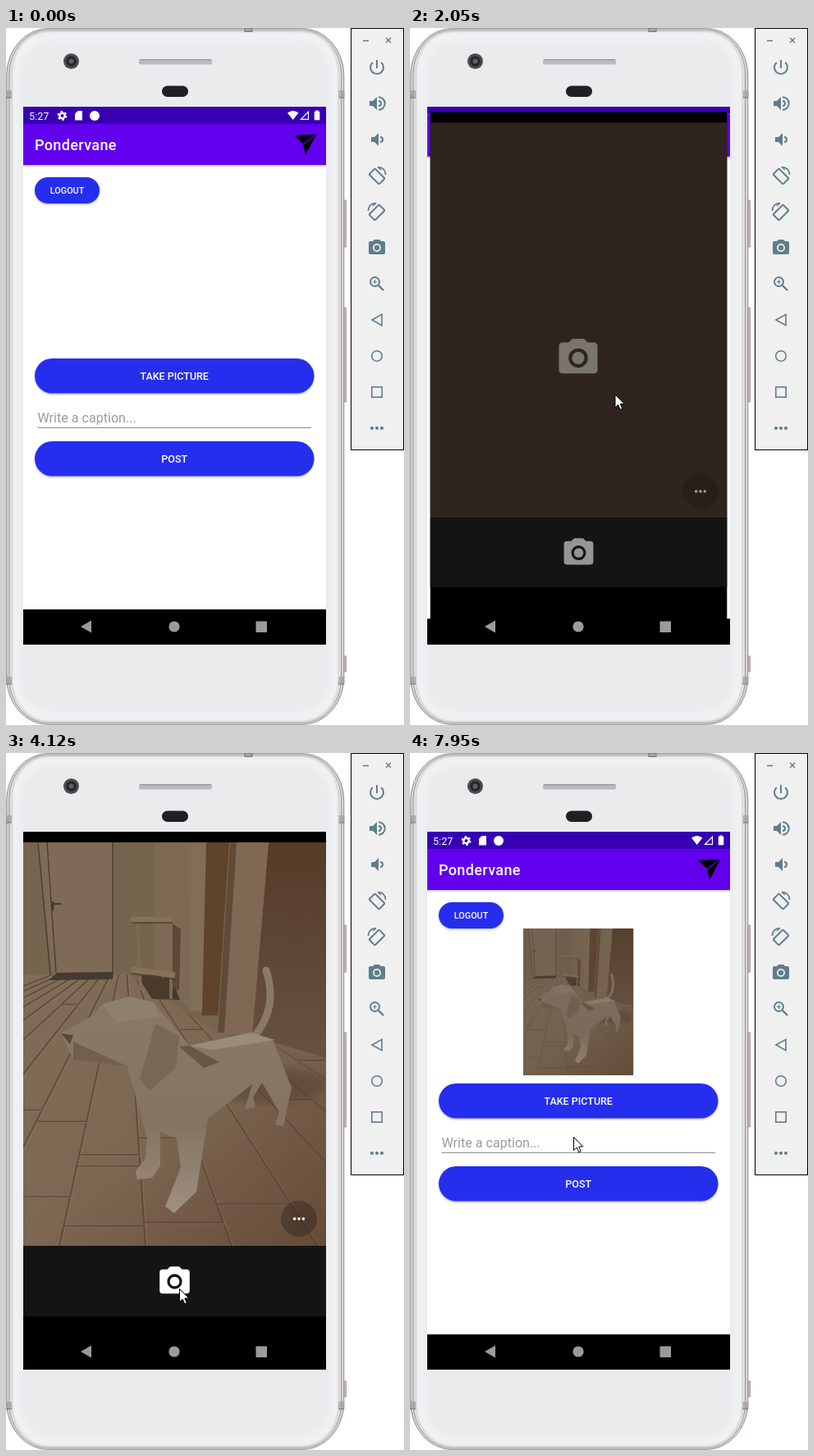
Write an HTML page that moves like this. It is 485x850 px and loops after 8000 ms.

```html
<!DOCTYPE html>
<html lang="en">
<head>
<meta charset="utf-8">
<title>Phone emulator</title>
<style>
html, body { margin: 0; width: 100%; height: 100%; overflow: hidden; background: #fff; }
svg { display: block; width: 485px; height: 850px; }
text { font-family: Roboto, sans-serif; }
.btn { font-weight: 500; fill: #fff; text-anchor: middle; }
</style>
</head>
<body>
<svg id="stage" viewBox="0 0 485 850" xmlns="http://www.w3.org/2000/svg"></svg>
<script>
const LOOP = 8000, STRIDE = 120;
const SLATE = '#5f7d8b', GREY = '#9b9b9b', BLUE = '#282eee';

const poly = (points, fill, extra = '') => `<polygon points="${points}" fill="${fill}" ${extra}/>`;
const rect = (x, y, w, h, fill, extra = '') => `<rect x="${x}" y="${y}" width="${w}" height="${h}" fill="${fill}" ${extra}/>`;
const disc = (x, y, r, fill, extra = '') => `<circle cx="${x}" cy="${y}" r="${r}" fill="${fill}" ${extra}/>`;
const line = (d, color, width = 1, extra = '') => `<path d="${d}" fill="none" stroke="${color}" stroke-width="${width}" ${extra}/>`;
const at = (x, y, body, extra = '') => `<g transform="translate(${x} ${y}) ${extra}">${body}</g>`;
const dots = (x, y, gap, r, fill) => [-1, 0, 1].map(i => disc(x + i * gap, y, r, fill)).join('');
const shutter = (x, y, scale, fill) => at(x, y, `<path fill="${fill}" fill-rule="evenodd"
  d="M-3 -10H3L5 -8H8Q10 -8 10 -6V6Q10 8 8 8H-8Q-10 8 -10 6V-6Q-10 -8 -8 -8H-5zM-5 0A5 5 0 0 0 5 0A5 5 0 0 0 -5 0z"/>`
  + disc(0, 0, 3.2, fill), `scale(${scale})`);

// Seeded random numbers in 0..1
let seed = 7;
const rand = () => (seed = seed * 16807 % 2147483647) / 2147483647;

const DEFS = `<defs>
  <clipPath id="screen">${rect(21, 96, 369, 656)}</clipPath>
  <clipPath id="view">${rect(21, 109, 369, 492)}</clipPath>
  <clipPath id="bar">${rect(21, 601, 369, 86)}</clipPath>
  <clipPath id="pill">${rect(35, 403, 340.5, 42.5, '', 'rx="21.25"')}</clipPath>
  <clipPath id="floor"><path d="M21 270H150L258 342L390 372V601H21z"/></clipPath>
  <linearGradient id="wood" x2="1" y2="1">
    <stop stop-color="#806c57"/><stop offset=".5" stop-color="#7d6752"/><stop offset="1" stop-color="#654b38"/>
  </linearGradient>
  <linearGradient id="brown" x2="0" y2="1"><stop stop-color="#543c29"/><stop offset="1" stop-color="#695140"/></linearGradient>
  <linearGradient id="coat" x2="0" y2="1"><stop stop-color="#8a7967"/><stop offset=".6" stop-color="#857361"/><stop offset="1" stop-color="#a09080"/></linearGradient>
  <filter id="soft"><feGaussianBlur stdDeviation="4"/></filter>
  <filter id="drop" x="-5%" y="-20%" width="110%" height="150%"><feDropShadow dx="0" dy="1.3" stdDeviation=".9" flood-opacity=".3"/></filter>
</defs>`;

function phone() {
  const shell = (inset, fill, stroke) => rect(inset, inset * .6, 412.5 - inset * 2, 850 - inset * 1.2, fill,
    `rx="${52 - inset}" ry="${58 - inset}" stroke="${stroke}"`);
  const band = y => rect(0, y, 8, 9, '#a8a1a3') + rect(404.5, y, 8, 9, '#a8a1a3') + line(`M0 ${y + 9}h8m396 0h8`, '#6f686a');
  const key = (y, h) => rect(412, y, 2.5, h, '#c9c3c5', 'stroke="#8c8587" stroke-width=".7"');
  return key(210, 57) + key(341, 115) + key(766, 19)
    + shell(.7, '#d5cfd1', '#968f92') + shell(4, '#e0dbdd', '#989194') + band(76) + band(791)
    + shell(7.5, '#e9ebed', '#c7c3c5')
    + rect(13, 10, 387, 830, 'none', 'rx="42" stroke="#f7f8f9" stroke-width="5" filter="url(#soft)"')
    + rect(291, 0, 9, 4.5, '#aaa3a5', 'stroke="#777072"')
    + disc(79.5, 40.5, 9.5, '#4b4c4e') + disc(79.5, 40.5, 6.3, '#252729') + disc(79.5, 40.5, 3, '#5a626b')
    + rect(162, 38, 89, 6.5, '#b9b9c1', 'rx="2"') + line('M163 38.6h87', '#8f8f98')
    + rect(190, 70.5, 32, 13.5, '#1e2023', 'rx="6.75"');
}

function panel() {
  const stroke = (d, w = 2) => line(d, SLATE, w);
  const speaker = x => poly('0,-3 4,-3 9,-8 9,8 4,3 0,3', SLATE, `transform="translate(${x} 0)"`);
  const wave = (x, r) => stroke(`M${x} ${-r}A${r} ${r} 0 0 1 ${x} ${r}`);
  const turn = rect(-8.5, -5, 17, 10, 'none', `rx="1" stroke="${SLATE}" stroke-width="2" transform="translate(0 1) rotate(45)"`)
    + stroke('M1 -10.5Q10 -10 10.7 -1M1 -10.5l4 3.5', 1.6);
  const icons = [
    stroke('M0 -9V1M-5.2 -6.1A8 8 0 1 0 5.2 -6.1'),
    speaker(-9) + wave(2, 3) + wave(2, 7.7),
    speaker(-7) + wave(4, 3),
    turn,
    `<g transform="scale(-1 1)">${turn}</g>`,
    shutter(0, 0, 1, SLATE),
    disc(-2.5, -2.5, 5.5, 'none', `stroke="${SLATE}" stroke-width="2"`) + stroke('M2 2L8 8', 2.4) + stroke('M-5 -2.5h5M-2.5 -5v5', 1.2),
    stroke('M-6 0L6 -6.7V6.7z', 1.6),
    disc(0, 0, 6.3, 'none', `stroke="${SLATE}" stroke-width="1.6"`),
    rect(-6.2, -6.2, 12.4, 12.4, 'none', `stroke="${SLATE}" stroke-width="1.6"`),
    dots(0, 0, 6, 2.1, SLATE)
  ];
  return rect(420.5, .5, 64, 514, '#f0f0f0', 'stroke="#000"')
    + line('M435 15.5h7m21 -3.5l6 6m0 -6l-6 6', '#66757c', 1.3)
    + icons.map((body, i) => at(452, 48 + 44 * i, body)).join('');
}

function planks() {
  const eye = { x: 145, y: 235 }, gap = 105, depth = 366;
  let d = '';
  for (let i = -8; i < 12; i++) {
    const foot = 65 + i * gap;
    d += `M${eye.x} ${eye.y}L${foot} 601`;
    for (let j = 0; j < 3; j++) {
      const k = .15 + .85 * rand();
      d += `M${eye.x + (foot - eye.x) * k} ${eye.y + depth * k}h${gap * k}`;
    }
  }
  return line(d, '#4d3a2b', 1.8, 'opacity=".6"') + line(d, '#947f69', 1, 'opacity=".4" transform="translate(2 1)"');
}

function scene() {
  const room = rect(21, 109, 369, 492, '#77644f')
    + poly('39,109 130,109 131,268 56,270', '#7e6a56') + line('M39 109L54 270M50 109L61 268M130 109V268', '#4b3d30', 1.4)
    + line('M57 184h10m-10 -3v11', '#43362b', 2)
    + poly('181,109 226,109 224,314 181,268', '#7d6954')
    + poly('243,109 273,109 262,320 238,320', '#5f432b')
    + poly('225,109 244,109 239,316 224,314', '#826d57')
    + poly('320,109 390,109 390,372 299,345', 'url(#brown)')
    + poly('272,109 320,109 300,345 257,341', '#7f6954') + line('M277 109L262 341', '#604b38', 8);
  const floor = `<g clip-path="url(#floor)">${rect(21, 260, 369, 341, 'url(#wood)') + planks()
    + '<ellipse cx="320" cy="405" rx="70" ry="22" fill="#4b3726" opacity=".4" filter="url(#soft)"/>'}</g>`
    + poly('52,277 62,268 131,267 130,276', '#443a31');
  const stool = poly('160,272 200,268 212,301 178,300', '#493a2c') + poly('203,208 213,215 211,290 203,285', '#5c4936')
    + line('M160 205L164 290M182 206V262M191 206V275M201 206V300', '#7c6853', 4)
    + line('M152 203H203M153 264L206 271', '#867159', 7) + line('M153 207H203M153 269L206 276', '#4f3f31', 1.4);
  const dog = line('M303 345Q332 310 317 265', '#8a7967', 9, 'stroke-linecap="round"')
    + '<path fill="url(#coat)" d="M67 342L106 320L118 306L150 297L180 304L224 357L298 341L325 350L348 408L338 455L328 453L333 438L312 402L301 420L304 432L291 434L300 404L246 446L232 535L205 561L194 553L213 505L208 470L188 462L188 503L178 518L160 520L158 510L170 494L172 470L148 382L82 374z"/>'
    + poly('224,357 298,341 328,350 252,362', '#9b8c79') + poly('211,358 224,357 260,377 241,384', '#695746')
    + poly('182,330 211,345 207,384 175,412 163,398', '#766451', 'opacity=".8"')
    + poly('118,306 150,297 180,304 188,322 134,328', '#928270', 'opacity=".8"')
    + poly('67,342 82,344 78,355', '#57483a') + poly('82,352 148,382 82,374', '#725f4d');
  return `<g id="scene" clip-path="url(#view)">${room + floor + stool + dog}</g>`;
}

function app() {
  const button = (x, y, w, h, label, size) => rect(x, y, w, h, BLUE, `rx="${h / 2}" filter="url(#drop)"`)
    + `<text class="btn" x="${x + w / 2}" y="${y + h / 2 + size * .37}" font-size="${size}">${label}</text>`;
  const wide = (y, label) => button(35, y, 340.5, 42.5, label, 12.5);
  const thumb = '<use href="#scene"/>' + rect(21, 109, 369, 492, '#5a4d42', 'opacity=".25"');
  return '<g id="app">'
    + rect(10, 80, 391, 690, '#fff')
    + rect(10, 117, 391, 50, '#6200ee', 'filter="url(#drop)"')
    + rect(10, 80, 391, 37, '#3700b3') + rect(10, 80, 391, 37, '#fff', 'id="tint"')
    + '<text x="35" y="149" font-size="18" font-weight="500" letter-spacing=".36" fill="#fff">Pondervane</text>'
    + poly('351,131 378,129.5 361.5,141', '#000') + poly('378,130.5 365,154.5 362,142.5', '#000')
    + button(35, 182, 79, 32, 'LOGOUT', 10.8)
    + `<g id="thumb">${at(138, 214, thumb, 'scale(.364) translate(-21 -109)')}</g>`
    + wide(403, 'TAKE PICTURE')
    + '<g clip-path="url(#pill)"><circle id="ripple" cx="197" cy="430" fill="#fff"/></g>'
    + '<text x="38.5" y="480.5" font-size="16.1" fill="#9b9b9b">Write a caption...</text>'
    + line('M38.5 487.5H372', '#8c8c8c')
    + wide(504, 'POST')
    + rect(10, 709, 391, 60, '#000') + '</g>';
}

function status() {
  const teeth = 2 * Math.PI * 5 / 12;
  return '<g id="status" fill="#fff"><text x="28" y="111.5" font-size="12.6">5:27</text>'
    + disc(68.5, 107, 3.2, 'none', 'stroke="#fff" stroke-width="2.4"')
    + disc(68.5, 107, 5, 'none', `stroke="#fff" stroke-width="1.8" stroke-dasharray="${teeth}"`)
    + poly('87.5,101 93,101 93,112.5 84,112.5 84,104.5', '#fff')
    + disc(108, 107, 6, '#fff')
    + '<path d="M343 103.6Q349.7 98.6 356.4 103.6L349.7 112z"/>'
    + line('M359.5 111.3h9v-9z', '#fff', 1.2)
    + rect(375.7, 101.8, 6.6, 10.5, '#fff') + rect(377.2, 100.5, 3.6, 2, '#fff') + '</g>';
}

function camera() {
  return '<g id="camera">' + rect(21, 96, 369, 656, '#000')
    + '<g id="live"><use href="#scene"/></g>'
    + rect(21, 109, 369, 492, '#7a6f66', 'id="flat" opacity=".22"')
    + rect(21, 109, 369, 492, '#382d24', 'id="cover"')
    + `<g id="splash">${shutter(205, 402, 2.4, '#fff')}</g>`
    + `<g id="more">${disc(357, 568, 22, '#000', 'opacity=".25"') + dots(357, 568, 5.4, 1.8, '#fff')}</g>`
    + rect(21, 601, 369, 86, '#141414')
    + '<g clip-path="url(#bar)"><ellipse id="reveal" cx="206" cy="601" ry="35" fill="#1d1d1d"/></g>'
    + `<g id="shutter">${shutter(205.5, 644.5, 1.83, '#fff')}</g>`
    + '<g id="review">' + rect(21, 601, 369, 108, '#1d1d1d')
    + line('M49 651H60A5.3 5.3 0 0 1 60 661.6H50M53 646.5l-4.5 4.5l4.5 4.5', '#fff', 2)
    + line('M190 655l9.5 9.5l20.5 -20.5', '#fff', 2.4)
    + line('M346 647l15.5 15.5m0 -15.5l-15.5 15.5', '#fff', 2) + '</g></g>';
}

const nav = poly('91,730 104,722.5 104,737.5', GREY) + disc(205, 730, 6.6, GREY) + rect(304.5, 723.5, 13.5, 13.5, GREY);

document.getElementById('stage').innerHTML = DEFS + rect(0, 0, 485, 850, '#fff') + phone()
  + `<g display="none">${scene()}</g><g clip-path="url(#screen)">${app() + status() + camera() + nav}</g>` + panel()
  + '<path id="cursor" d="M.5 .5V16.5L4.2 13L6.7 18.8L9.2 17.7L6.8 12H11.8z" fill="#fff" stroke="#000" stroke-linejoin="round"/>';

const el = {};
document.querySelectorAll('[id]').forEach(node => { el[node.id] = node; });

// Pointer glides: start time, number of strides, goal
const GLIDES = [
  [620, 4, 196, 429], [1930, 4, 303, 464], [3220, 1, 282, 459], [3370, 4, 235, 517],
  [3880, 3, 211, 653], [7150, 2, 200, 525], [7420, 3, 199, 468]
];

// Progress 0..1 in n equal jumps, the first one at the start time
const stair = (t, start, n) => Math.min(n, Math.max(0, Math.floor((t - start) / STRIDE) + 1)) / n;
const show = (node, on) => node.setAttribute('display', on ? 'inline' : 'none');
const fade = (node, a) => node.setAttribute('opacity', a);
const zoom = (node, s) => node.setAttribute('transform', `translate(205.5 424) scale(${s}) translate(-205.5 -424)`);

function pointer(t) {
  let x = 139, y = 802;
  for (const [start, n, gx, gy] of GLIDES) {
    const p = stair(t, start, n);
    x += (gx - x) * p;
    y += (gy - y) * p;
  }
  show(el.cursor, t >= 500);
  el.cursor.setAttribute('transform', `translate(${x} ${y})`);
}

function draw(t) {
  const press = stair(t, 1260, 2), release = stair(t, 1530, 2);
  const open = stair(t, 1930, 3), focus = stair(t, 2440, 3);
  const shot = stair(t, 4630, 2), back = stair(t, 7000, 3);

  pointer(t);
  el.ripple.setAttribute('r', 190 * press ** 1.4);
  fade(el.ripple, .2 * (1 - release));

  zoom(el.app, back ? 1 + .018 * (1 - back) : 1 + .06 * open);
  fade(el.tint, back ? .225 * (1 - back) : 0);
  show(el.thumb, back);
  show(el.status, open < .5 || back);

  show(el.camera, open && !back);
  zoom(el.camera, .94 + .06 * open);
  fade(el.camera, Math.min(1, open * 1.5));
  show(el.live, focus);
  fade(el.cover, .84 * (1 - focus));
  fade(el.splash, .36 * (1 - focus));
  fade(el.more, t < 4930 ? .55 + .45 * focus : 0);
  fade(el.shutter, shot ? 0 : .55 + .45 * focus);
  show(el.flat, t >= 4930);
  el.reveal.setAttribute('rx', 344 * shot);
  show(el.review, t >= 5210);
}

const start = performance.now();
function tick() {
  draw((performance.now() - start) % LOOP);
  requestAnimationFrame(tick);
}
tick();
</script>
</body>
</html>
```
